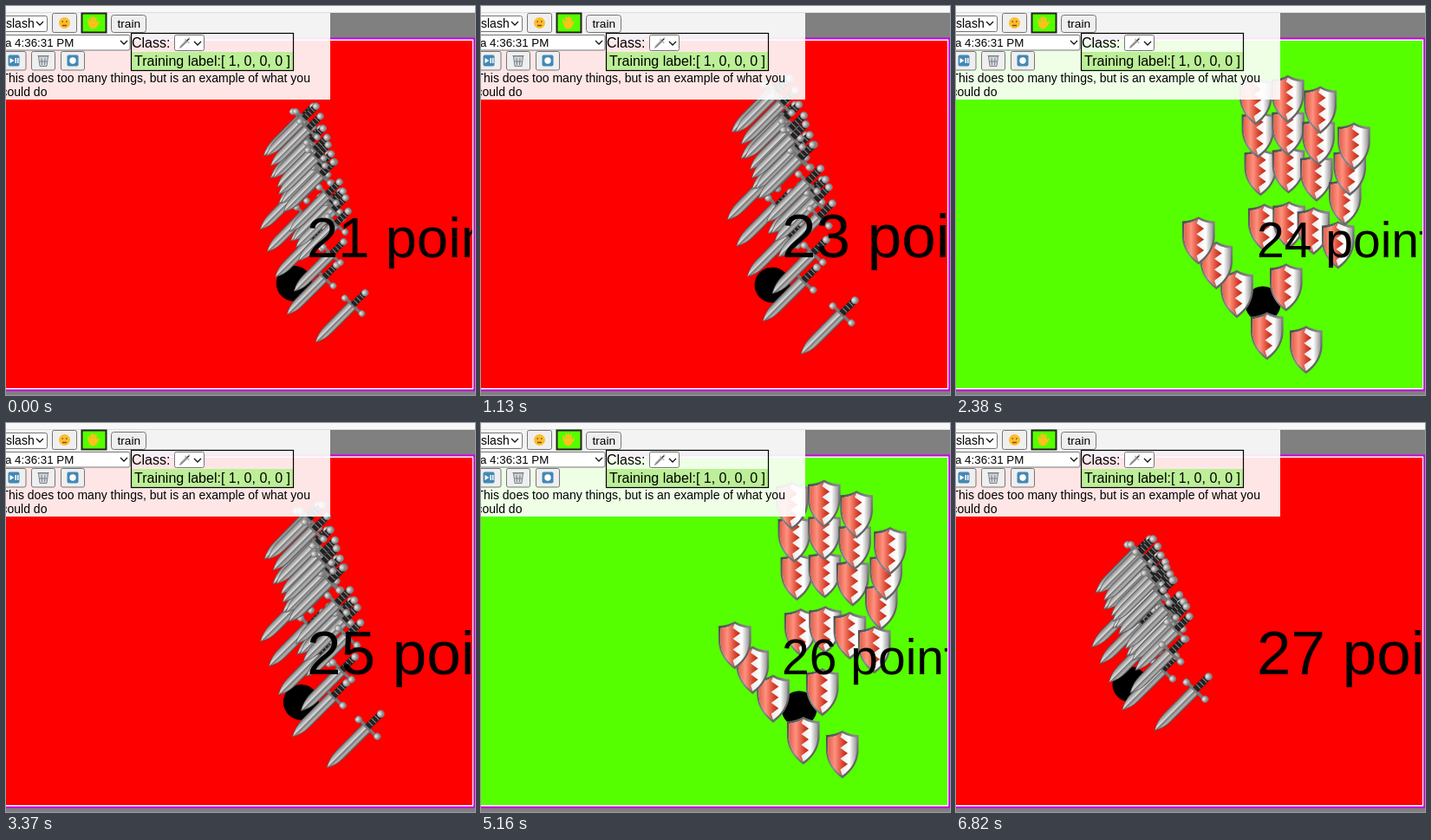
An HTML page that plays this animation: 541x449 px, repeating every 6840 ms.

```html
<!DOCTYPE html>
<html lang="en">
<head>
<meta charset="utf-8">
<title>Hand pose game</title>
<style>
  html, body { margin: 0; width: 100%; height: 100%; overflow: hidden; background: #808080; }
  svg { display: block; width: 541px; height: 449px; font-family: "Liberation Sans", Arial, sans-serif; }
  .field { fill: #fff; stroke: #767676; }
  .button { fill: #efefef; stroke: #767676; }
  .chevron { fill: none; stroke: #111; stroke-width: 1.3; }
</style>
</head>
<body>
<svg viewBox="0 0 541 449">
  <defs>
    <linearGradient id="steel" x1="0" x2="0" y1="0" y2="1">
      <stop offset="0" stop-color="#666"/><stop offset=".15" stop-color="#999"/>
      <stop offset=".46" stop-color="#ddd"/><stop offset=".54" stop-color="#777"/>
      <stop offset=".8" stop-color="#b4b4b4"/><stop offset="1" stop-color="#555"/>
    </linearGradient>
    <linearGradient id="silver">
      <stop offset=".4" stop-color="#e6e6e6"/><stop offset=".75" stop-color="#fff"/><stop offset="1" stop-color="#999"/>
    </linearGradient>
    <linearGradient id="enamel">
      <stop offset="0" stop-color="#e2604c"/><stop offset=".35" stop-color="#ff917e"/>
      <stop offset=".75" stop-color="#d8432e"/><stop offset="1" stop-color="#b92814"/>
    </linearGradient>
    <linearGradient id="rim" x2="1" y2="1">
      <stop offset="0" stop-color="#444"/><stop offset=".5" stop-color="#8a8a8a"/><stop offset="1" stop-color="#444"/>
    </linearGradient>
    <radialGradient id="ball" cx=".4" cy=".35">
      <stop offset="0" stop-color="#eee"/><stop offset="1" stop-color="#888"/>
    </radialGradient>
    <!-- One em is 100 units; the origin is the left end of the baseline. -->
    <g id="dagger" transform="translate(0 14) rotate(-45)">
      <path d="M0 0Q14-8 30-8.5L92-9V9L30 8.5Q14 8 0 0Z" fill="url(#steel)" stroke="#555"/>
      <path d="M93-19V21" stroke="#777" stroke-width="5"/>
      <path d="M94 0H121" stroke="#222" stroke-width="11"/>
      <path d="M101-5V5M108-5V5M115-5V5" stroke="#888" stroke-width="1.5"/>
      <g fill="url(#ball)" stroke="#777" stroke-width=".8">
        <circle cx="92" cy="-19" r="5.5"/><circle cx="94" cy="22" r="5.5"/><circle cx="124" r="6"/>
      </g>
    </g>
    <g id="shield">
      <path d="M47-82Q62-73 80-73V-40Q78-8 47 15Q16-8 14-40V-73Q32-73 47-82Z" fill="url(#rim)"/>
      <path d="M47-77Q60-69 76-68V-40Q74-10 47 9Q20-10 18-40V-68Q34-69 47-77Z" fill="url(#silver)"/>
      <path d="M47-77Q34-69 18-68V-40Q20-10 47 9L43-3L58-14L43-25L58-36L43-47L58-58L43-69Z" fill="url(#enamel)"/>
    </g>
    <path id="arrow" d="M-4-2L0 2L4-2" class="chevron"/>
    <clipPath id="arena"><rect y="40" width="538" height="401"/></clipPath>
  </defs>

  <rect width="541" height="449" fill="#808080"/>
  <path d="M0 36.5H541V444.5H0Z" fill="#c800e0"/>
  <path d="M0 38.5H539.2V442.5H0Z" fill="#fff"/>
  <g clip-path="url(#arena)">
    <rect id="ground" y="40" width="538" height="401"/>
    <circle id="palm" r="20.5"/>
    <g id="props"></g>
    <text id="score" x="347" y="290"></text>
  </g>

  <rect width="541" height="8" fill="#f8f8f8"/>
  <path d="M0 7.5H541" stroke="#ddd"/>
  <rect y="8" width="374" height="100" fill="#fff" fill-opacity=".9"/>

  <rect x="-10" y="11.5" width="57.5" height="18" rx="2" class="field"/>
  <text x="0" y="25" font-size="14">slash</text><use href="#arrow" x="39" y="20"/>
  <rect x="53.5" y="8.5" width="28" height="22" rx="2" class="button"/>
  <circle cx="67.5" cy="19.5" r="6.5" fill="#fdbe2c"/>
  <path d="M64.5 18H66M69 18H70.5M65 22.5H70" stroke="#7a4d12" stroke-width="1.3"/>
  <rect x="87.5" y="8.5" width="28" height="22" fill="#5f0" stroke="#222" stroke-width="2"/>
  <path d="M96 20L95 16M98.5 19V13.5M101 19V13M103.5 19V14M104 23L107 18.5" stroke="#fcc21b" stroke-width="2.2" stroke-linecap="round"/>
  <path d="M95 18H105V22Q104 26.5 100 26.5Q95 26 95 18Z" fill="#fcc21b"/>
  <rect x="121.5" y="10.5" width="40" height="20" rx="3" class="button"/>
  <text x="128.5" y="25" font-size="13.7">train</text>

  <rect x="-10" y="33.5" width="153" height="17.5" rx="2" class="field"/>
  <text x="-1" y="46.5" font-size="13.333">a 4:36:31 PM</text><use href="#arrow" x="136" y="42"/>
  <g class="button">
    <rect x="-10" y="52.5" width="33" height="21.5" rx="2"/>
    <rect x="29.5" y="52.5" width="27" height="21.5" rx="2"/>
    <rect x="63.5" y="52.5" width="27" height="21.5" rx="2"/>
  </g>
  <rect x="2.5" y="56.5" width="13" height="13" rx="2" fill="#4388b5"/>
  <path d="M4.5 60L9.5 63L4.5 66ZM10.5 60H12V66H10.5ZM13 60H14.5V66H13Z" fill="#fff"/>
  <path d="M37.5 58L39 69.5H47L48.5 58Z" fill="#d5d8da" stroke="#77818a"/>
  <path d="M36.5 57.5H49.5M41 60L41.5 68M45 60L44.5 68M38.5 64H47.5" stroke="#77818a"/>
  <rect x="70.5" y="56.5" width="13" height="13" rx="2" fill="#4388b5"/>
  <circle cx="77" cy="63" r="3.7" fill="#fff"/>
  <g font-size="14"><text x="-5.5" y="88">This does too many things, but is an example of what you</text><text x="-5.5" y="104">could do</text></g>

  <rect x="145" y="53" width="186" height="21" fill="#bcef98"/>
  <rect x="144.5" y="31.5" width="187" height="43" fill="none" stroke="#000" stroke-width="1.2"/>
  <g font-size="16"><text x="145" y="48">Class:</text><text x="148" y="69">Training label:[ 1, 0, 0, 0 ]</text></g>
  <rect x="194.5" y="33.5" width="34" height="18" rx="2" class="field"/>
  <use href="#dagger" transform="translate(200 47) scale(.13)"/><use href="#arrow" x="221" y="43"/>
</svg>
<script>
const LOOP = 6840, STEP = 58.52;

// Points are relative to the wrist; thumb and finger are vectors from their base to the tip.
const open = {
  prop: '#shield', ground: '#5f0',
  palm: [-23, -72], thumbBase: [-45, -16], thumb: [-79, -110],
  index: [-48, -141], pinky: [37, -121], finger: [-10, -146], fan: 26
};
const side = {
  prop: '#dagger', ground: '#f00',
  palm: [-33, -70], thumbBase: [-44, -38], thumb: [-41, -117],
  index: [-38, -139], pinky: [-26, -112], finger: [-42, -117], fan: 2
};

// Time, hand, wrist position, horizontal and vertical foreshortening.
const motion = [
  [0, side, 357, 379, .75, .84],
  [480, open, 367, 408, 1, 1],
  [1143, side, 369, 392, 1, 1],
  [1800, side, 341, 402, 1, 1],
  [2170, side, 369, 396, 1, 1],
  [2372, open, 377, 416, 1, 1],
  [2700, open, 380, 414, 1, 1],
  [3367, side, 370, 388, .9, .94],
  [4303, open, 390, 403, 1, 1],
  [5700, open, 390, 401, 1, 1],
  [5883, side, 374, 355, .72, .9],
  [6400, side, 369, 390, .95, .98],
  [6820, side, 229, 345, .85, .62]
];

const $ = id => document.getElementById(id);
const mix = (a, b, k) => a + (b - a) * k;
const mixPoint = (a, b, k) => [mix(a[0], b[0], k), mix(a[1], b[1], k)];
const add = (a, b) => [a[0] + b[0], a[1] + b[1]];
const chain = (base, reach) => [0, .44, .74, 1].map(k => add(base, reach.map(v => v * k)));

function ease(k) {
  k = Math.min(1, Math.max(0, k));
  return k * k * (3 - 2 * k);
}

// Wrist, thumb, four fingers from index to pinky, then the palm.
function landmarks(hand) {
  const points = [[0, 0], ...chain(hand.thumbBase, hand.thumb)];
  for (let f = 0; f < 4; f++) {
    const k = f / 3;
    const base = mixPoint(hand.index, hand.pinky, k);
    base[1] -= 11 * Math.sin(Math.PI * k);
    const length = 1 - .22 * k ** 4;
    points.push(...chain(base, [hand.finger[0] * length + hand.fan * k, hand.finger[1] * length]));
  }
  return [...points, hand.palm];
}

function place([, hand, x, y, kx, ky]) {
  return landmarks(hand).map(p => [x + p[0] * kx, y + p[1] * ky]);
}

// The hand changes sign halfway between two unlike poses, which scores a point.
function stateAt(t) {
  let points = 21, since = -220, i = 0;
  motion.slice(1).forEach(([time, hand], n) => {
    const middle = (time + motion[n][0]) / 2;
    if (hand !== motion[n][1] && t >= middle) { points++; since = middle; }
    if (t >= time && n < motion.length - 2) i = n + 1;
  });
  const from = motion[i], to = motion[i + 1];
  const k = (t - from[0]) / (to[0] - from[0]);
  const hand = (k < .5 ? from : to)[1];
  const target = place(to);
  return {
    points, hand,
    marks: place(from).map((p, n) => mixPoint(p, target[n], ease(k))),
    size: hand === open ? 57 : mix(46, 71, ease((t - since) / 320))
  };
}

const props = Array.from({ length: 22 }, () =>
  $('props').appendChild(document.createElementNS('http://www.w3.org/2000/svg', 'use')));

function draw(time) {
  const t = time < 75 ? 0 : 90 + STEP * Math.floor((time - 90) / STEP + .25);
  const { points, hand, marks, size } = stateAt(t);
  const [cx, cy] = marks[21];

  $('ground').setAttribute('fill', hand.ground);
  $('palm').setAttribute('cx', cx);
  $('palm').setAttribute('cy', cy);
  marks.forEach(([x, y], i) => {
    props[i].setAttribute('href', hand.prop);
    props[i].setAttribute('transform', `translate(${x} ${y}) scale(${size / 100})`);
  });
  $('score').setAttribute('font-size', size);
  $('score').textContent = `${points} points`;
}

function tick() {
  draw(performance.now() % LOOP);
  requestAnimationFrame(tick);
}
tick();
</script>
</body>
</html>
```
